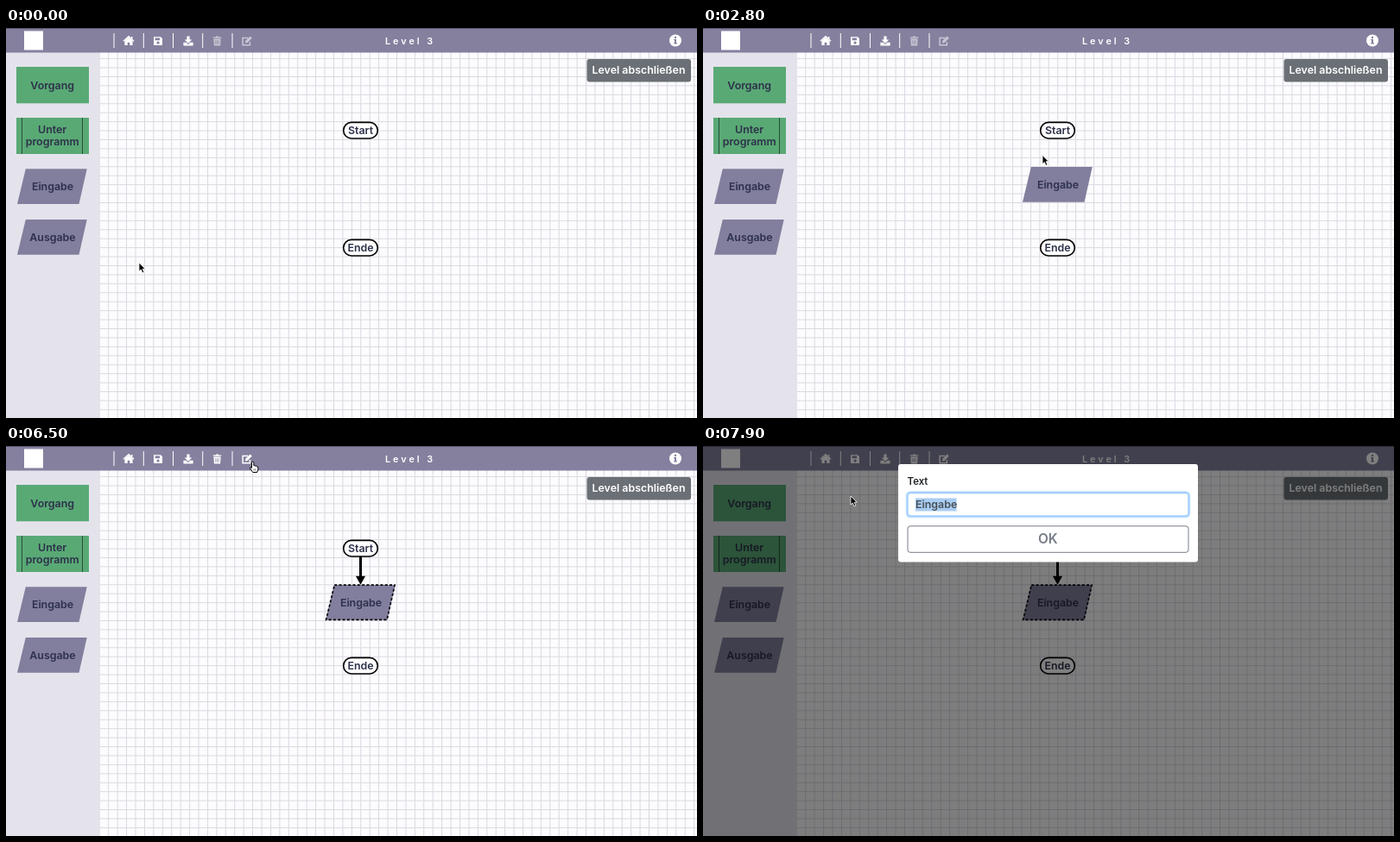
Write an HTML page that moves like this. It is 800 px wide and 452 px high and loops after 8000 ms.

```html
<!DOCTYPE html>
<html lang="de">
<head>
<meta charset="utf-8">
<title>Level 3</title>
<style>
html, body { margin: 0; width: 100%; height: 100%; overflow: hidden; background: #fcfbfd; }
svg { display: block; width: 100vw; height: 100vh; }
text { font: 600 12.4px Inter, "Open Sans", sans-serif; text-anchor: middle; fill: #2d314a; }
.title { font-size: 10.8px; letter-spacing: 3px; text-anchor: start; fill: #fff; }
.left { text-anchor: start; }
.outline { fill: #fff; stroke: #000; stroke-width: 1.4; }
.icon { fill: #fff; }
.line { fill: none; stroke: #fff; stroke-width: 1.5; }
</style>
</head>
<body>
<svg viewBox="0 0 800 452" id="stage"></svg>
<script>
const CELL = 10.43, LOOP = 8000, STEP = 100;
const BOX_X = 159.8, BOX_Y = 181.2, END_X = 410.5;
const SLANT = "-30.7,-20.3 40.2,-20.3 31,20.5 -40.5,20.5";

const label = (x, y, s, attrs = "") => `<text x="${x}" y="${y + 4.4}" ${attrs}>${s}</text>`;
const rect = (x, y, w, h, fill, extra = "") =>
  `<rect x="${x}" y="${y}" width="${w}" height="${h}" fill="${fill}" ${extra}/>`;
const slanted = (x, y, s) =>
  `<g transform="translate(${x} ${y})"><polygon points="${SLANT}" fill="#827e9d"/>${label(.5, 0, s)}</g>`;
const terminal = (y, s) =>
  rect(END_X - 19.8, y - 9.3, 39.6, 18.6, "#fff", 'rx="9.3" stroke="#000" stroke-width="1.6"') + label(END_X, y, s);
const at = (x, y, body, attrs = "") => `<g transform="translate(${x} ${y})" ${attrs}>${body}</g>`;
const blockArrow = id =>
  `<path id="${id}" class="outline" d="M0-8 10.3 1H4.8V7.7H-4.8V1H-10.3Z"/>`;

const home = `<path class="icon" d="M0-4.2 4.6 0V5H1.3V1.8H-1.3V5H-4.6V0Z"/>
  <path class="line" d="M-6 .2 0-5.2 6 .2M3.7-5V-2"/>`;
const save = `<path class="icon" fill-rule="evenodd" d="M-5-4.8H3L5-2.8V5H-5ZM-3.4-3.4V-.8H2V-3.4ZM0 .6A1.6 1.6 0 1 0 .1 .6Z"/>`;
const load = `<path class="icon" d="M-1.6-5.5H1.6V-1.5H4.3L0 2.9-4.3-1.5H-1.6ZM-5.6 1.8H-2.4L0 4.2 2.4 1.8H5.6V5.5H-5.6Z"/>`;
const trash = `<path class="icon" d="M-4.8-4.6H-1.8L-1.2-5.5H1.2L1.8-4.6H4.8V-3.2H-4.8ZM-4.1-2.4H4.1L3.6 5.4H-3.6Z"/>
  <path d="M-1.8-.8V3.8M0-.8V3.8M1.8-.8V3.8" stroke="#84809e" stroke-width=".7"/>`;
const edit = `<path class="line" d="M1.2-3.6H-4.9V4.8H3.4V1"/>
  <path class="icon" d="M-2 2.5-1.6-.2 3.6-5.4 5.8-3.2 .6 2Z"/>`;

const pointers = {
  arrow: `<path d="M0 0V10L2.3 8 4 11.8 5.8 11 4.2 7.2H7.2Z" stroke="#fff" stroke-width=".8"/>`,
  move: `<path d="M0-5.5 2-3H.8V-.8H3V-2L5.5 0 3 2V.8H.8V3H2L0 5.5-2 3H-.8V.8H-3V2L-5.5 0-3-2V-.8H-.8V-3H-2Z"
    stroke="#fff" stroke-width="1.6" paint-order="stroke"/>`,
  hand: `<path d="M-1 1.2Q-1-.3.2-.3T1.4 1.2V4.2Q2.7 3.7 3.2 4.7 4.3 4.3 4.8 5.3 6.3 5.2 6.3 6.6V8.7L5.2 12H.3L-2.9 7.5Q-3.3 6.2-2.1 6.2L-1 7.1Z"
    fill="#fff" stroke="#000" stroke-width="1"/><path d="M1.4 8V10M3.2 8V10" stroke="#000" stroke-width=".6"/>`,
  beam: `<path d="M-2-6Q0-6 0-4.5 0-6 2-6M0-4.5V4.5M-2 6Q0 6 0 4.5 0 6 2 6" fill="none" stroke="#000"/>`
};

const stage = document.getElementById("stage");
stage.innerHTML = `
<defs><pattern id="grid" x="107.8" y="24.7" width="${CELL}" height="${CELL}" patternUnits="userSpaceOnUse">
  <path d="M.5 0V${CELL}M0 .5H${CELL}" stroke="#dad8e1" fill="none"/></pattern></defs>
${rect(0, 0, 800, 452, "#fcfbfd")}
${rect(109, 28, 691, 424, "url(#grid)")}
${rect(0, 28, 109, 424, "#e4e3ec")}
${rect(0, 0, 800, 28.5, "#84809e")}
${rect(0, 0, 800, 1, "#55536a")}
${rect(21, 3.5, 22, 22, "#fff")}
${[125, 159.3, 193.5, 227.7, 262].map(x => rect(x - .5, 6, 1, 17, "#fff")).join("")}
${at(142, 15, home)}${at(176, 15, save)}${at(211, 15, load)}
${at(244.5, 15, trash, 'id="trash"')}${at(279, 15, edit, 'id="edit"')}
${label(439, 14.4, "Level 3", 'class="title"')}
<circle cx="775" cy="14.5" r="7" fill="#fff"/>
<path d="M773.2 13H776V17.3H777V18.6H773.2V17.3H774V14.3H773.2Z" fill="#84809e"/><circle cx="775" cy="11" r="1.2" fill="#84809e"/>
${rect(672.5, 36, 120.5, 26.5, "#6b7076", 'rx="3"')}
${label(732.5, 49, "Level abschließen", 'style="fill:#fff"')}
${rect(12, 45, 84, 42.3, "#59a975")}${label(53.7, 66.5, "Vorgang")}
${rect(12, 104, 84, 42, "#59a975")}
<path d="M18.5 104V146M88.5 104V146" stroke="#264e3a"/>
${label(53.7, 117.5, "Unter")}${label(53.7, 132, "programm")}
${slanted(53.5, 183.6, "Eingabe")}${slanted(53.5, 242.3, "Ausgabe")}
${terminal(118.7, "Start")}${terminal(254.7, "Ende")}
<g id="box">${slanted(0, 0, "Eingabe")}
  <polygon id="dash" points="${SLANT}" fill="none" stroke="#000" stroke-width="1.7" stroke-dasharray="3 2.4" transform="scale(.985)"/></g>
<g id="arrows">${["up", "down", "left", "right"].map(blockArrow).join("")}</g>
<g id="edge"><path id="shaft" stroke="#000" stroke-width="3"/><path id="head" d="M0 0-5.6-10H5.6Z"/></g>
<rect id="shade" width="800" height="452"/>
<g id="dialog">
  ${rect(226, 21, 347, 113.5, "#fff", 'rx="3"')}
  ${label(236.5, 40.8, "Text", 'class="left" style="font-size:11.4px;fill:#212529"')}
  <rect id="ring" x="236" y="53.5" width="327" height="28.5" rx="4" fill="none" stroke="#bfdeff" stroke-width="2.4"/>
  <rect id="field" x="237" y="54.5" width="325" height="26.5" rx="3" fill="#fff"/>
  <rect id="mark" y="60.5" height="15" fill="#a9cdf3"/>
  ${label(246, 68, "Eingabe", 'class="left" style="fill:#495057"')}
  ${rect(237, 92.8, 325, 30.5, "#fff", 'rx="3" stroke="#777d88"')}
  ${label(399.3, 108.7, "OK", 'style="font-size:15.4px;fill:#777d88"')}
</g>
<g id="cursor">${Object.entries(pointers).map(([k, p]) => `<g data-kind="${k}">${p}</g>`).join("")}</g>`;

const $ = id => document.getElementById(id);
const show = (id, on) => $(id).setAttribute("visibility", on ? "visible" : "hidden");
const place = (id, x, y, turn = 0) => $(id).setAttribute("transform", `translate(${x} ${y}) rotate(${turn})`);
const clamp = v => Math.max(0, Math.min(1, v));
const between = (t, a, b) => t >= a && t < b;

// time, x, y
const path = [
  [0, 154, 272], [700, 56, 187], [1000, 64, 185], [1200, 209, 181], [1500, 345, 181], [1800, 402, 181],
  [1900, 402, 181], [2300, 384, 148], [2500, 384, 148], [2800, 393, 147.5], [3200, 409, 120], [3500, 410, 141],
  [3700, 410, 143], [4300, 408, 178], [4900, 402.5, 181], [5800, 402.5, 181], [6500, 285.5, 18.5], [6700, 285.5, 18.5],
  [6800, 289, 24.5], [7000, 291, 38], [7400, 293, 68], [7600, 293, 68], [7900, 171, 58]
];
// time from which a pointer is shown
const kinds = [[0, "arrow"], [500, "hand"], [900, "arrow"], [1100, "move"], [2100, "arrow"], [3000, "move"],
  [3400, "hand"], [3700, "arrow"], [4300, "move"], [6000, "arrow"], [6400, "hand"], [6800, "arrow"],
  [7200, "beam"], [7800, "arrow"]];

function pointerAt(t) {
  const i = path.findIndex(p => p[0] > t);
  if (i < 0) return path[path.length - 1].slice(1);
  const [a, x, y] = path[i - 1], [b, u, v] = path[i];
  const k = (t - a) / (b - a), e = k * k * (3 - 2 * k);
  return [x + (u - x) * e, y + (v - y) * e];
}

function putArrows(x, y, dx, dy) {
  place("up", x, y - dy);
  place("down", x, y + dy, 180);
  place("left", x - dx, y, -90);
  place("right", x + dx, y, 90);
}

function draw(t) {
  const [cx, cy] = pointerAt(t);
  const kind = kinds.filter(k => k[0] <= t).pop()[1];
  place("cursor", cx, cy);
  for (const g of $("cursor").children) g.style.display = g.dataset.kind === kind ? "" : "none";

  let bx = t < 1300 ? BOX_X : END_X;
  if (between(t, 1300, 1800)) bx = Math.min(END_X, BOX_X + CELL * Math.round((cx + 8 - BOX_X) / CELL));
  place("box", bx, BOX_Y);
  $("box").style.display = t >= 1000 ? "" : "none";
  show("dash", between(t, 1000, 2700) || t >= 5400);

  const active = between(t, 1900, 2700) || t >= 5500;
  for (const id of ["trash", "edit"]) $(id).setAttribute("opacity", active ? 1 : .55);

  const onStart = between(t, 3000, 3700);
  const onBox = between(t, 1100, 1300) || between(t, 1800, 2100) || between(t, 4300, 6000);
  $("arrows").style.display = onStart || onBox ? "" : "none";
  if (onStart) putArrows(END_X, 118.7, 34, 23);
  else putArrows(bx, BOX_Y, 53.6, 33);

  const tip = 140 + 20.8 * clamp((t - 3700) / 600);
  $("edge").style.display = t >= 3700 ? "" : "none";
  $("shaft").setAttribute("d", `M${END_X} 128V${tip - 8}`);
  place("head", END_X, tip);

  const k = clamp((t - 6700) / 300);
  $("shade").setAttribute("opacity", t < 6800 ? 0 : t < 6900 ? .19 : t < 7000 ? .44 : .5);
  $("dialog").setAttribute("opacity", t < 6800 ? 0 : t < 6900 ? .38 : t < 7000 ? .8 : 1);
  place("dialog", 0, -50 * (1 - k) ** 1.75);
  const focus = t >= 7000;
  show("ring", focus);
  $("field").setAttribute("stroke", focus ? "#80bdff" : "#dcdfe3");
  const from = Math.max(246, cx);
  show("mark", t >= 7700);
  $("mark").setAttribute("x", from);
  $("mark").setAttribute("width", Math.max(0, 293.5 - from));
}

function tick() {
  draw(Math.floor(performance.now() % LOOP / STEP) * STEP);
  requestAnimationFrame(tick);
}
tick();
</script>
</body>
</html>
```
